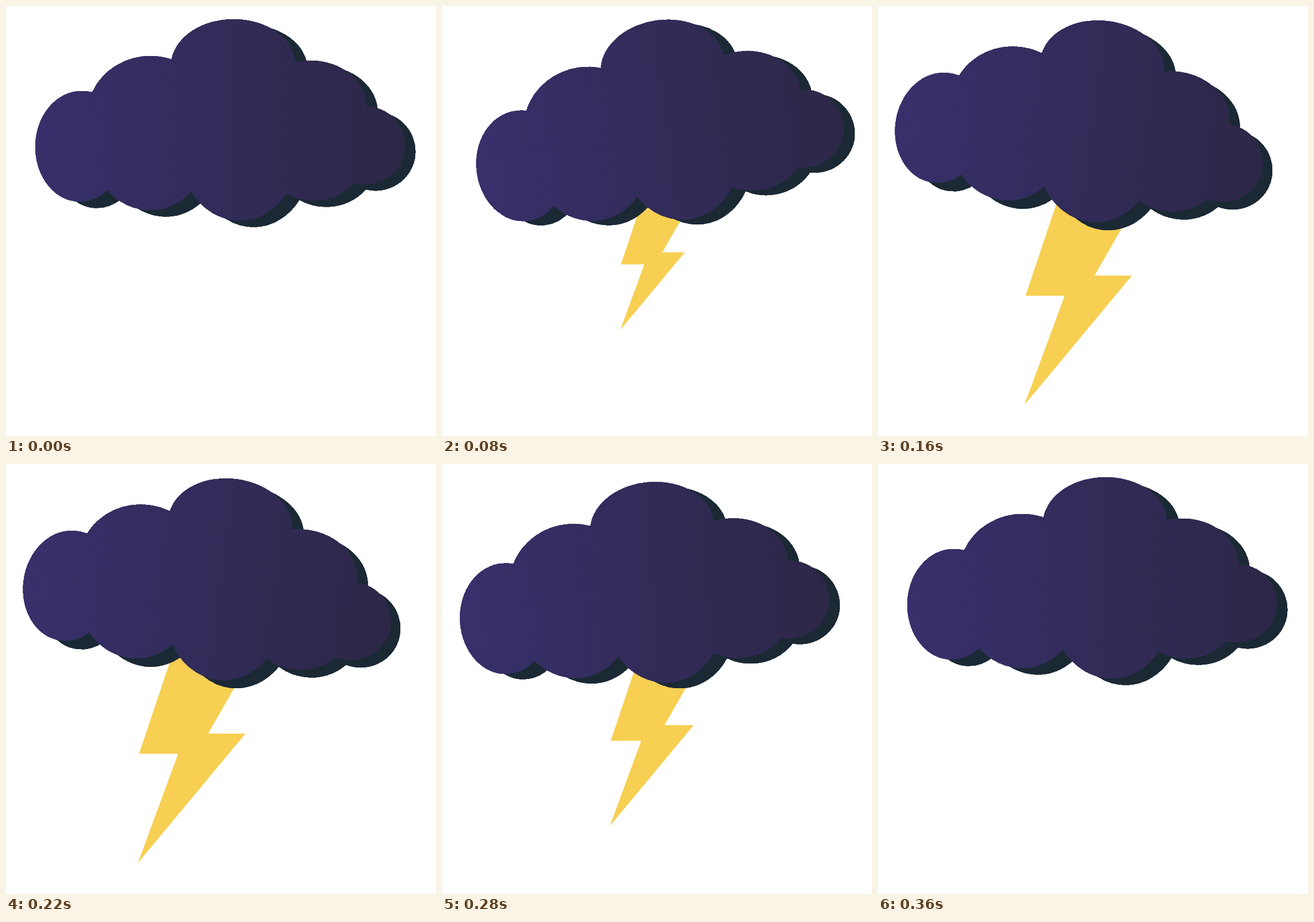
Recreate the animation shown at these times as an HTML page. Size 748 by 748 pixels, loop 380 ms.

```html
<!DOCTYPE html>
<html lang="en">
<head>
<meta charset="utf-8">
<title>Storm cloud</title>
<style>
  html, body { margin: 0; width: 100%; height: 100%; overflow: hidden; background: #fff; }
  svg { display: block; width: 100%; height: 100%; }
</style>
</head>
<body>
<svg viewBox="0 0 748 748">
  <defs>
    <linearGradient id="night">
      <stop offset="0" stop-color="#37306b"/>
      <stop offset="1" stop-color="#2d2747"/>
    </linearGradient>
    <path id="puffs" d="M150 150 A80 96 0 0 0 131 148 A80 97 0 0 0 51 245
      A76 95 0 0 0 127 340 A78 96 0 0 0 176 320
      A100 102 0 0 0 252 355 A100 112 0 0 0 322 322
      A100 109 0 0 0 407 373 A100 112 0 0 0 488 326
      A92 87 0 0 0 536 338 A92 88 0 0 0 606 308
      A71 67 0 0 0 623 310 A71 67 0 0 0 694 243 A67 68 0 0 0 627 175
      A97 80 0 0 0 531 95 A97 80 0 0 0 502 98
      A107 76 0 0 0 396 23 A109 81 0 0 0 288 93
      A110 104 0 0 0 251 87 A110 104 0 0 0 150 150 Z"/>
  </defs>
  <path id="bolt" fill="#f7cf52" d="M261 694 L448 469 H383 L480 300 H331.5 L263 504 H331 Z"/>
  <g id="cloud" shape-rendering="crispEdges" stroke-width=".8">
    <use href="#puffs" fill="#1b2935" stroke="#1b2935" transform="matrix(.979 0 0 1.005 32.7 9.6)"/>
    <use href="#puffs" fill="url(#night)" stroke="url(#night)"/>
  </g>
</svg>
<script>
const LOOP = 380, STEP = 20;
const cloud = document.getElementById('cloud');
const bolt = document.getElementById('bolt');

const clamp = v => Math.min(1, Math.max(0, v));
const ramp = (t, a, b) => clamp((t - a) / (b - a));
const bump = (t, a, b) => Math.sin(Math.PI * ramp(t, a, b));

function moveCloud(t) {
  const x = 1.7 * ramp(t, 0, 80) - 19.5 * ramp(t, 80, 120)
    - 5 * ramp(t, 220, 280) + 22.8 * ramp(t, 280, 360);
  const y = -9 * bump(t, 0, 80) + 5 * bump(t, 65, 160) + 9 * bump(t, 220, 340);
  // The rocking mirrors itself around the middle of the loop.
  const u = Math.abs(t - LOOP / 2);
  const tilt = 7.3 * (1 - 2 * ramp(u, 30, 110) + ramp(u, 110, 150));
  cloud.setAttribute('transform', `translate(${x} ${y}) rotate(${tilt} 381.5 203.8)`);
}

function moveBolt(t) {
  const back = ramp(t, 220, 280);
  const x = -31.5 * ramp(t, 120, 220) ** 1.75 + 35.5 * back;
  const y = 7.5 * back;
  const size = clamp(Math.min(t - 20, 358 - t) / 100);
  bolt.setAttribute('visibility', size > 0 ? 'visible' : 'hidden');
  bolt.setAttribute('transform',
    `translate(${383.5 + x} ${368 + y}) scale(${size}) translate(-383.5 -368)`);
}

const start = performance.now();
function tick() {
  const t = Math.floor((performance.now() - start) % LOOP / STEP) * STEP;
  moveCloud(t);
  moveBolt(t);
  requestAnimationFrame(tick);
}
tick();
</script>
</body>
</html>
```
